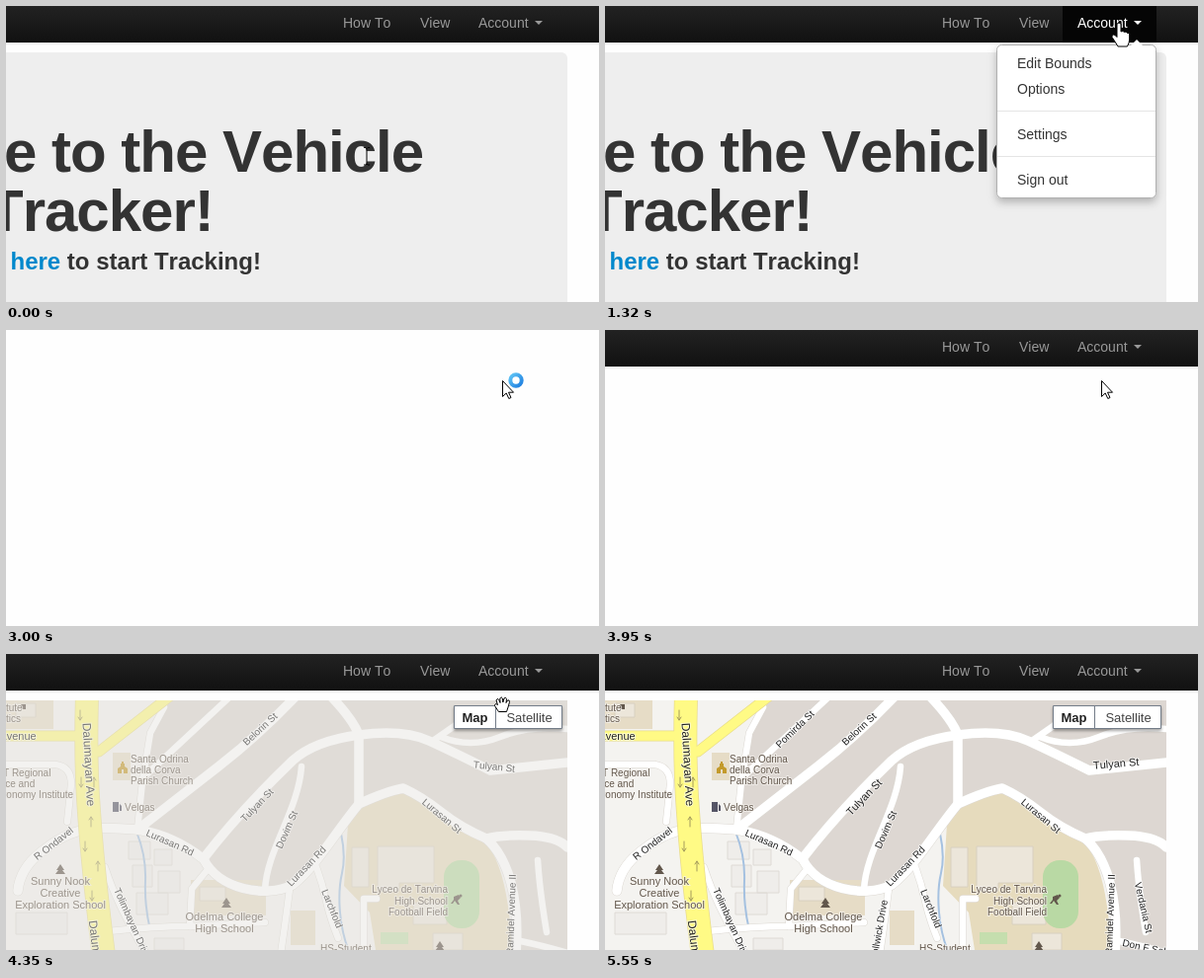
An HTML page that plays this animation: 600x300 px, repeating every 5.86 s.

```html
<!DOCTYPE html>
<html lang="en">
<head>
<meta charset="utf-8">
<title>Vehicle Tracker</title>
<style>
html, body { margin: 0; width: 100%; height: 100%; overflow: hidden; background: #fefefe; }
svg { display: block; width: 600px; height: 300px; font: 14px "Liberation Sans", Arial, sans-serif; font-kerning: none; }
#welcome { font-weight: bold; fill: #333; }
#welcome .big { font-size: 60px; letter-spacing: -1px; }
#welcome .small { font-size: 24px; }
#wide path, #thin path, #mainRoads path { fill: none; stroke-linecap: round; stroke-linejoin: round; }
.street { fill: #222; stroke: #fff; stroke-width: 2; stroke-opacity: .6; paint-order: stroke; text-anchor: middle; }
.place { fill: #62574c; stroke: #f6f4f0; stroke-width: 2; stroke-opacity: .7; paint-order: stroke; }
.pointer path { stroke: #000; stroke-width: 1; stroke-linejoin: round; }
</style>
</head>
<body>
<svg viewBox="0 0 600 300">
  <defs>
    <linearGradient id="barFill" x2="0" y2="1"><stop stop-color="#222"/><stop offset="1" stop-color="#111"/></linearGradient>
    <linearGradient id="barShade" x2="0" y2="1"><stop stop-opacity=".1"/><stop offset="1" stop-opacity="0"/></linearGradient>
    <linearGradient id="hoverFill" x2="0" y2="1"><stop stop-color="#08c"/><stop offset="1" stop-color="#0077b3"/></linearGradient>
    <linearGradient id="ringFill" x2="1" y2="1"><stop stop-color="#5fc4f5"/><stop offset="1" stop-color="#1f7fe0"/></linearGradient>
    <filter id="menuShade" x="-20%" y="-20%" width="140%" height="140%"><feDropShadow dx="0" dy="4" stdDeviation="4" flood-opacity=".25"/></filter>
    <filter id="buttonShade" x="-20%" y="-30%" width="140%" height="180%"><feDropShadow dx="0" dy="2" stdDeviation="1.5" flood-opacity=".35"/></filter>
    <clipPath id="mapClip"><rect y="47" width="568" height="253"/></clipPath>
    <g id="wide">
      <path d="M12 240Q14 218 35 201T72 180Q90 174 133 178Q170 184 200 208C215 238 262 248 290 234C315 214 335 178 357 152Q385 139 402 136Q420 144 440 160T486 187"/>
      <path d="M200 207Q238 158 290 108Q312 88 357 82Q402 76 428 88T490 118L568 110"/>
      <path d="M357 152L357 82Q351 66 328 42"/>
      <path d="M133 178Q175 145 215 114T294 42"/>
      <path d="M486 187Q503 202 511 232T516 304"/>
      <path d="M486 187Q502 183 530 184T568 196"/>
    </g>
    <g id="thin">
      <path d="M133 178L138 130 146 80 160 54"/>
      <path d="M138 126Q170 96 228 42"/>
      <path d="M262 239C264 198 296 158 299 114"/>
      <path d="M287 238Q283 270 278 304"/>
      <path d="M314 216Q320 232 324 250T336 288"/>
      <path d="M100 216Q108 240 118 260T142 304"/>
      <path d="M104 281Q150 276 186 276L262 272"/>
      <path d="M186 276L188 238 206 216"/>
      <path d="M432 88L455 72"/>
      <path d="M440 84Q470 96 500 84T568 76"/>
      <path d="M538 209Q540 240 547 282"/>
      <path d="M516 290Q545 296 568 303"/>
      <path d="M362 300V248H375"/>
      <path d="M-5 112H50Q66 114 66 132L62 170"/>
    </g>
  </defs>

  <rect width="600" height="300" fill="#fefefe"/>

  <g id="welcome">
    <rect x="-10" y="47" width="578" height="270" rx="6" fill="#eee"/>
    <text class="big" x="-2" y="168">e to the Vehicle</text>
    <text class="big" x="-19" y="228">Tracker!</text>
    <text class="small" x="4.5" y="267"><tspan fill="#08c">here</tspan> to start Tracking!</text>
  </g>

  <g id="mapBox" clip-path="url(#mapClip)">
    <rect y="47" width="568" height="253" fill="#e5e3df"/>
    <g id="tiles">
      <rect y="47" width="568" height="253" fill="#f4f3f0"/>
      <path fill="#ddd7d2" d="M133 178L146 80 166 47H568V300H516Q514 225 486 187Q440 160 402 136L357 152Q335 178 290 234Q262 248 225 235L200 208Q170 184 133 178Z"/>
      <path fill="#e6dcc6" d="M0 47H48V76H0ZM187 229H263V265H187ZM108 100H126V128H108ZM288 260H313V295H288Z"/>
      <path fill="#e6dbbd" d="M346 172L357 154 402 138Q450 168 484 190Q508 215 512 300H374L368 262 342 235Z"/>
      <path fill="#ece6da" stroke="#d8d0c0" d="M350 196H367V236H350ZM376 195H433V232H398V240H376ZM412 252H446V274H412ZM432 283H462V300H432ZM10 50H30V64H10ZM196 236H222V250H196Z"/>
      <path fill="#efedea" stroke="#dedad5" d="M124 190H146V208H124ZM150 198H168V214H150ZM128 214H148V236H128ZM154 220H176V242H154ZM132 242H164V264H132ZM10 262H62V284H10ZM150 288H180V300H150Z"/>
      <rect x="443" y="209" width="36" height="69" rx="17" fill="#b9d9a4"/>
      <rect x="379" y="282" width="28" height="12" fill="#c5deae"/>
      <path d="M339 182Q344 205 340 222T338 262T348 304M132 180Q142 205 141 230T146 280" fill="none" stroke="#a5c1e0" stroke-width="2"/>
      <g stroke="#dcd8d2"><use href="#wide" stroke-width="10.5"/><use href="#thin" stroke-width="7.5"/></g>
      <g stroke="#fff"><use href="#wide" stroke-width="9.5"/><use href="#thin" stroke-width="6.5"/></g>
      <g id="mainRoads"></g>
      <g id="icons" fill="#62574c">
        <rect x="15" y="51" width="5" height="5"/>
        <path fill="#c39a2b" d="M113 121V116L116 114V111H117V109H119V111H120V114L123 116V121H119V117H117V121Z"/>
        <path fill="#556" d="M108 150H114V160H108ZM115 152L117 154V159H115Z"/>
        <path id="tree" d="M55 213L59 219H57L60 223H50L53 219H51Z"/>
        <use href="#tree" x="168" y="34"/><use href="#tree" x="384" y="78"/>
        <path d="M453 246L458 244 460 247 457 250 459 254H457L454 250 452 253H450L453 249Z"/><circle cx="460" cy="245" r="1.5"/>
      </g>
      <g id="labels"></g>
      <g id="early"></g>
      <g id="late"></g>
    </g>
    <g id="buttons">
      <g fill="#fff" stroke="#737c88" filter="url(#buttonShade)"><path d="M453.5 52.5H495.5V75.5H453.5ZM495.5 52.5H562.5V75.5H495.5Z"/></g>
      <g font-size="13" text-anchor="middle" fill="#222"><text x="474.5" y="69" font-weight="bold">Map</text><text x="529.5" y="69" fill="#444">Satellite</text></g>
    </g>
  </g>

  <g id="bar">
    <rect y="37" width="600" height="3" fill="url(#barShade)"/>
    <rect width="600" height="37" fill="url(#barFill)"/>
    <rect id="accountBack" x="463" width="95" height="37" fill="#050505"/>
    <g fill="#999"><text x="341" y="22">How To</text><text x="419" y="22">View</text><text id="account" x="478" y="22">Account</text></g>
    <path id="caret" d="M535 15H543L539 19Z"/>
  </g>

  <g id="menu">
    <rect x="396.5" y="39.5" width="161" height="155" rx="5" fill="#fff" stroke="#b0b0b0" filter="url(#menuShade)"/>
    <path d="M532 40L538 34 544 40Z" fill="#fff"/>
    <path d="M397 106.5H557M397 152.5H557" stroke="#e5e5e5"/>
    <rect id="hover" x="397" y="45" width="160" height="26" fill="url(#hoverFill)"/>
    <g fill="#333"><text id="edit" x="417" y="63">Edit Bounds</text><text x="417" y="89">Options</text><text x="417" y="135">Settings</text><text x="417" y="181">Sign out</text></g>
  </g>

  <g id="cursor" class="pointer" fill="#fff">
    <g id="beam"><path d="M-3 -8.5H-1L0 -7.5 1 -8.5H3M0 -7.5V8M-3 9H-1L0 8 1 9H3" fill="none"/></g>
    <g id="arrow"><path d="M.5 .5V16.5L4.2 13 6.8 18.5 9 17.5 6.5 12.2H11.5Z"/></g>
    <g id="link"><path d="M-2 1Q0 -1 2 1V9Q4 7.5 5.5 9.5Q7.5 8 8.5 10.5Q10.5 9.5 10.7 12V17Q10.5 20 8.5 24H-1Q-4 19 -7 14.5Q-7 11 -4 12.5L-2 14.5Z"/></g>
    <g id="grab"><path d="M-3.5 7.5L-7.5 1.5Q-7.5 -1.5 -4.5 .5L-6 -4Q-5 -7 -3.2 -4.5L-2 -1.5 -2.2 -6Q-1 -8.5 .4 -6L.8 -2 2 -6Q3.5 -8 4.5 -5.5L4 -1.5 5.5 -4Q7.5 -5 7.5 -2.5L6 3 4.5 7.5Z"/></g>
    <circle id="ring" cx="14" cy="0" r="5.7" stroke="url(#ringFill)" stroke-width="4"/>
  </g>
</svg>
<script>
const LOOP = 5860;
const $ = id => document.getElementById(id);
const show = (id, on) => $(id).style.display = on ? "" : "none";

function add(parent, tag, attrs, text) {
  const el = document.createElementNS("http://www.w3.org/2000/svg", tag);
  for (const key in attrs) el.setAttribute(key, attrs[key]);
  if (text) el.textContent = text;
  $(parent).append(el);
}

const avenue = "M82 42Q80 110 84 160Q88 220 99 306";
const sideRoads = "M-5 83H82M94 99L168 41";
for (const [d, stroke, width] of [
  [sideRoads, "#e9dd8a", 11], [avenue, "#e9dd8a", 24],
  [sideRoads, "#fffa85", 9.5], [avenue, "#fffa85", 22.5]
]) add("mainRoads", "path", { d, stroke, "stroke-width": width });

// One-way arrows, alternating direction along the avenue
for (const [x, y, dir] of [[75, 62, 1], [76, 130, 1], [89, 130, -1], [86, 170, -1], [80, 195, 1], [93, 215, -1], [87, 245, 1]])
  add("mainRoads", "path", { d: `M${x} ${y - 5 * dir}v${10 * dir}m-2 ${-3 * dir}l2 ${3 * dir} 2 ${-3 * dir}`, stroke: "#a39a5c" });

function street(group, [text, x, y, angle, size = 10]) {
  add(group, "text", { class: "street", dy: ".35em", "font-size": size, transform: `translate(${x} ${y}) rotate(${angle})` }, text);
}

[
  ["Dalumayan Ave", 84, 112, 87, 12], ["Dalumayan Ave", 93, 312, 83, 12],
  ["Belorin St", 257, 76, -43], ["Dovim St", 284, 178, -66],
  ["Lurasan Rd", 166, 191, 24], ["Lurasan Rd", 304, 215, -46], ["Lurasan St", 441, 164, 40],
  ["R Ondavel", 48, 192, -38], ["Tolimbayan Drive", 128, 273, 66],
  ["Larchfold", 330, 258, 68], ["Ramidel Avenue II", 511, 264, -88], ["Avenue", 12, 83, 0, 11]
].forEach(row => street("labels", row));

[["Tulyan St", 254, 153, -46], ["Tulyan St", 494, 114, 6]].forEach(row => street("early", row));

[
  ["Tulyan St", 262, 145, -46, 11], ["Tulyan St", 517, 111, -5, 11], ["Pomirda St", 192, 76, -44],
  ["Hollwick Drive", 277, 280, -80], ["Verdania St", 545, 257, 77], ["Don F Salvaro", 555, 299, 12]
].forEach(row => street("late", row));

for (const [x, y, size, anchor, step, ...lines] of [
  [126, 110, 10, "start", 11, "Santa Odrina", "della Corva", "Parish Church"],
  [120, 159, 10, "start", 11, "Velgas"],
  [55, 234, 11, "middle", 12, "Sunny Nook", "Creative", "Exploration School"],
  [221, 270, 11, "middle", 12, "Odelma College", "High School"],
  [447, 242, 10, "end", 11.5, "Lyceo de Tarvina", "High School", "Football Field"],
  [-3, 124, 10, "start", 11, "T Regional", "ice and", "ronomy Institute"],
  [0, 58, 10, "start", 11, "tute", "tics"],
  [318, 302, 10, "start", 11, "HS-Student"]
]) lines.forEach((line, i) =>
  add("labels", "text", { class: "place", x, y: y + i * step, "font-size": size, "text-anchor": anchor }, line));

// Each move runs in equal time steps: start, end, steps, from, to
const moves = [
  [370, 910, 10, [365, 152], [519, 17]],
  [1080, 1320, 5, [519, 17], [520, 17]],
  [1380, 1560, 4, [520, 17], [502, 51]],
  [4960, 5490, 10, [502, 51], [575, 299]]
];

function cursorAt(t) {
  let [start, end, n, from, to] = moves[0];
  for (const move of moves) if (t >= move[0]) [start, end, n, from, to] = move;
  const k = Math.floor((t - start) / (end - start) * (n - 1) + 1e-6) + 1;
  const p = Math.max(0, Math.min(1, k / n));
  const ease = p * p * (3 - 2 * p);
  return from.map((v, i) => Math.round(v + (to[i] - v) * ease));
}

function cursorKind(t, x, y) {
  if (t < 1770) return y < 37 || t >= 1030 && t < 1680 ? "link" : y > 118 ? "beam" : "arrow";
  return t >= 4300 && x <= 568 ? "grab" : "arrow";
}

const fade = [[4300, .28], [4350, .55], [4390, .72], [4450, .88], [4520, 1]];

function draw(t) {
  const [x, y] = cursorAt(t);
  const kind = cursorKind(t, x, y);
  const menuOpen = t >= 1030 && t < 1680;
  const onLink = t < 1680 && y < 37;
  const hover = menuOpen && y >= 40;

  show("welcome", t < 3000);
  show("bar", t < 3000 || t >= 3910);
  show("menu", menuOpen);
  show("accountBack", menuOpen);
  show("hover", hover);
  $("edit").setAttribute("fill", hover ? "#fff" : "#333");
  $("account").setAttribute("fill", menuOpen || onLink ? "#fff" : "#999");
  $("caret").setAttribute("fill", menuOpen ? "#fff" : "#999");

  show("mapBox", t >= 4040);
  show("buttons", t >= 4300);
  $("tiles").style.opacity = fade.reduce((value, [at, next]) => t >= at ? next : value, 0);
  show("early", t < 4450);
  show("late", t >= 4450);

  for (const id of ["beam", "arrow", "link", "grab"]) show(id, id === kind);
  show("ring", t >= 1770 && t < 3950);
  show("cursor", t < 5550);
  $("cursor").setAttribute("transform", `translate(${x} ${y})`);
}

const begin = performance.now();
function tick() {
  draw((performance.now() - begin) % LOOP);
  requestAnimationFrame(tick);
}
draw(0);
requestAnimationFrame(tick);
</script>
</body>
</html>
```
